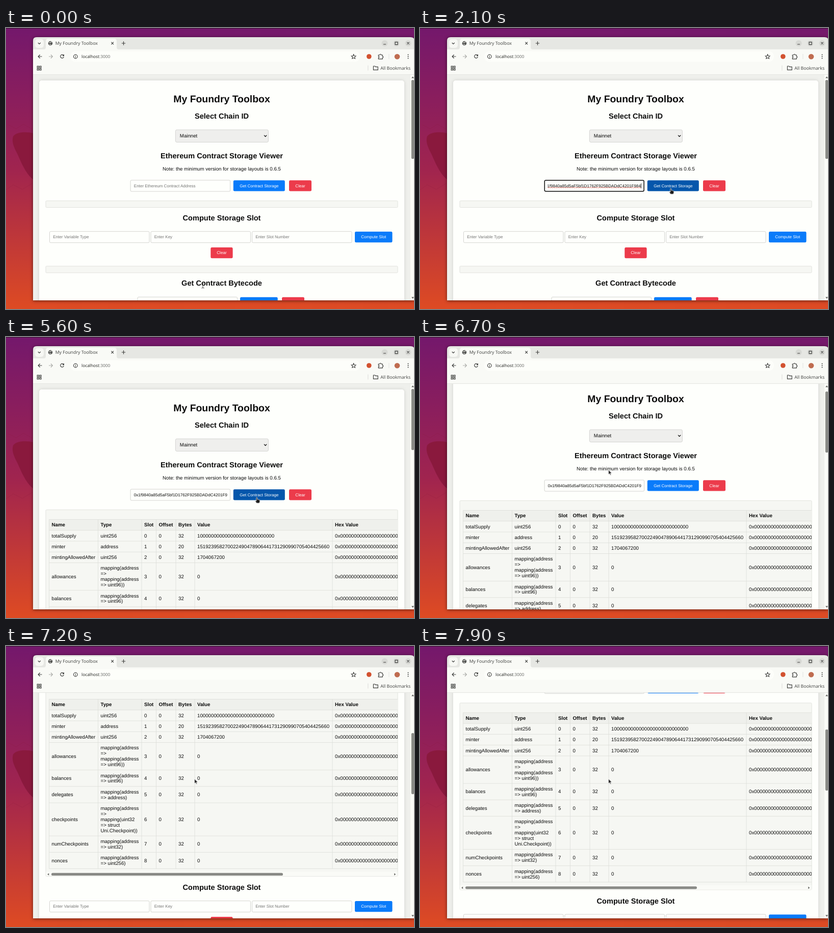
Write an HTML page that moves like this. It is 800 px wide and 552 px high and loops after 8000 ms.

```html
<!DOCTYPE html>
<html lang="en">
<head>
<meta charset="utf-8">
<title>My Foundry Toolbox</title>
<style>
html, body { margin: 0; width: 100%; height: 100%; overflow: hidden; background: #74186c; }
svg { display: block; width: 800px; height: 552px; }
text { font-family: "Liberation Sans", Arial, sans-serif; font-size: 9.71px; fill: #0c0c0c; white-space: pre; text-rendering: geometricPrecision; }
.h1 { font-size: 19.42px; font-weight: bold; text-anchor: middle; }
.h2 { font-size: 14.57px; font-weight: bold; text-anchor: middle; }
.mid { text-anchor: middle; }
.bold { font-weight: bold; }
.small { font-size: 8.09px; }
.hint { font-size: 8.09px; fill: #757575; }
.label { font-size: 8.09px; fill: #fff; text-anchor: middle; }
.ui { font-family: "Noto Sans", "Open Sans", sans-serif; font-size: 8.75px; fill: #4a4b49; }
.url { font-size: 8.3px; fill: #2a2b29; }
.icon { fill: none; stroke: #3c3d3b; stroke-width: 1.15; }
.blue { fill: #0a7bfa; }
.red { fill: #ec3b4b; }
.field { fill: #fefffc; stroke: #c9cac6; stroke-width: .8; }
.panel { fill: #f6f7f3; stroke: #dcddd9; stroke-width: .8; }
.grid { fill: none; stroke: #dcddd9; stroke-width: .8; }
.window { filter: drop-shadow(0 1px 3px rgba(0, 0, 0, .55)); }
.card { fill: #fefffc; filter: drop-shadow(0 0 3px rgba(0, 0, 0, .13)); }
</style>
</head>
<body>
<svg id="stage" viewBox="0 0 800 552" xmlns="http://www.w3.org/2000/svg"></svg>
<script>
const LOOP = 8000;
const ADDRESS = "0x1f9840a85d5aF5bf1D1762F925BDADdC4201F984";
const TABLE_SHIFT = 355;

const text = (x, y, str, cls = "") => `<text x="${x}" y="${y}" class="${cls}">${str}</text>`;
const rect = (x, y, w, h, attrs = "", r = 0) => `<rect x="${x}" y="${y}" width="${w}" height="${h}" rx="${r}" ${attrs}/>`;
const path = (d, attrs = 'class="icon"') => `<path d="${d}" ${attrs}/>`;
const circle = (x, y, r, attrs) => `<circle cx="${x}" cy="${y}" r="${r}" ${attrs}/>`;
const group = (id, body, attrs = "") => `<g id="${id}" ${attrs}>${body}</g>`;
const input = (x, y, hint) =>
  rect(x, y, 195.5, 22, 'class="field"', 2) + text(x + 6.7, y + 13.7, hint, "hint");
const button = (x, y, w, label, cls, id = "") =>
  rect(x, y, w, 21.3, `class="${cls}" id="${id}"`, 2.4) + text(x + w / 2, y + 13.4, label, "label");

function desktop() {
  return `<defs>
    <linearGradient id="sky" x1="0" y1="0" x2="0" y2="1">
      <stop offset="0" stop-color="#74186c"/><stop offset=".5" stop-color="#a0244f"/><stop offset="1" stop-color="#de4b23"/>
    </linearGradient>
    <clipPath id="view"><rect x="53" y="92" width="740" height="443"/></clipPath>
    <clipPath id="inner"><rect x="250.4" y="300" width="183.4" height="20"/></clipPath>
    <clipPath id="wide"><rect x="78" y="339" width="690" height="370"/></clipPath>
  </defs>` +
  rect(0, 0, 800, 552, 'fill="url(#sky)"') +
  rect(0, 0, 800, 1, 'fill="#35142f"') +
  path("M54 207C40 203 20 204 14 213C10 226 18 238 24 251C32 270 42 290 54 298Z", 'fill="#8a193d"') +
  path("M0 318l14-10 18 9 20-12M4 190l16 8 14-9 18 10", 'fill="none" stroke="#8a193d" stroke-opacity=".25"');
}

function browser() {
  const controls = [742.5, 765.5, 788.5].map(x => circle(x, 30, 6, 'fill="#d7d8d4"')).join("");
  const squares = [61.2, 66].flatMap(x => [75, 79.8].map(y => rect(x, y, 3, 3, 'class="icon" stroke-width=".9"'))).join("");
  const dots = [52.6, 56, 59.4].map(y => circle(788.5, y, 1, 'fill="#3c3d3b"')).join("");
  return path("M53 535V25Q53 18 60 18H793Q801 18 801 25V535Z", 'fill="#e6e7e3" class="window"') +
    rect(57, 22, 17, 17, 'fill="#f7f8f4"', 5) + path("M62.8 29l2.5 2.5 2.5-2.5") +
    path("M74 42Q78 42 78 38V26Q78 21 83 21H212Q217 21 217 26V38Q217 42 221 42Z", 'fill="#f9faf6"') +
    circle(87, 30, 4.3, 'fill="#555654"') +
    path("M84 28l3 1 1-2 2 1M85 32l2 0 1 1.5", 'fill="none" stroke="#f2f3ef" stroke-width="1"') +
    text(96.7, 33.2, "My Foundry Toolbox", "ui") +
    path("M206.4 27.7l4.6 4.6m0-4.6l-4.6 4.6") + path("M230.5 26.3v7.4m-3.7-3.7h7.4") +
    controls + path("M740 32h5M763 27.6h5v5h-5zM786.3 27.8l4.4 4.4m0-4.4l-4.4 4.4") +
    rect(53, 42, 747, 50, 'fill="#f9faf6"') +
    rect(126, 45.5, 568, 21, 'fill="#fdfefa"', 10.5) +
    path("M70.5 56h-7.3m3.4-3.5l-3.5 3.5 3.5 3.5") +
    path("M84 56h7.3m-3.4-3.5l3.5 3.5-3.5 3.5", 'fill="none" stroke="#a9aaa6" stroke-width="1.1"') +
    path("M113 54a3.4 3.4 0 1 0 .3 2.8M113.4 52v2.6h-2.6") +
    circle(136.3, 56, 3.8, 'class="icon"') + path("M136.3 55.4v2.8m0-4.8v1") +
    `<text x="148" y="59.2" class="ui url">localhost<tspan fill="#6f706e">:3000</tspan></text>` +
    path("M681.6 51.8l1.3 2.9 3.1.3-2.3 2.1.7 3.1-2.8-1.6-2.8 1.6.7-3.1-2.3-2.1 3.1-.3z", 'class="icon" stroke-width=".9"') +
    circle(711.8, 56, 4.8, 'fill="#d2512f"') +
    path("M730.3 53h2.5a1.5 1.5 0 0 1 3 0h2.4v2.6a1.5 1.5 0 0 1 0 3v2.2h-7.9v-2.4a1.4 1.4 0 0 0 0-2.8z") +
    rect(750.5, 51, .8, 10, 'fill="#dcddd9"') +
    circle(767, 56.3, 5.3, 'fill="#bf6c50"') + dots +
    squares + rect(709.5, 73.5, .8, 10, 'fill="#d3d4d0"') +
    path("M720.4 75h3.2l1.2 1.3h4.4v6h-8.8z") + text(734.2, 81.8, "All Bookmarks", "ui") +
    rect(53, 91.2, 747, .8, 'fill="#dfe0dc"');
}

function table() {
  const cols = [84.5, 180.5, 266, 294.5, 333, 370, 640, 790];
  const rows = [
    ["totalSupply", "uint256", 32, "1" + "0".repeat(27)],
    ["minter", "address", 20, "151923958270022490478906441731290990705404425660"],
    ["mintingAllowedAfter", "uint256", 32, "1704067200"],
    ["allowances", "mapping(address|=&gt;|mapping(address|=&gt; uint96))", 32, "0"],
    ["balances", "mapping(address|=&gt; uint96)", 32, "0"],
    ["delegates", "mapping(address|=&gt; address)", 32, "0"],
    ["checkpoints", "mapping(address|=&gt;|mapping(uint32|=&gt; struct|Uni.Checkpoint))", 32, "0"],
    ["numCheckpoints", "mapping(address|=&gt; uint32)", 32, "0"],
    ["nonces", "mapping(address|=&gt; uint256)", 32, "0"]
  ].map(([name, type, bytes, value], slot) => [name, type, slot, 0, bytes, value, "0x" + "0".repeat(40)]);
  rows.unshift(["Name", "Type", "Slot", "Offset", "Bytes", "Value", "Hex Value"]);

  const LINE = 10.95, top = 358.5;
  let y = top, out = "", lines = `M84.5 ${top}H790`;
  rows.forEach((cells, r) => {
    const h = 10.3 + LINE * cells[1].split("|").length;
    if (!r) out += rect(84.5, y, 706, h, 'fill="#eff0ec"');
    cells.forEach((cell, c) => {
      const parts = String(cell).split("|");
      parts.forEach((part, i) => {
        const base = y + h / 2 + 3.3 + (i - (parts.length - 1) / 2) * LINE;
        out += text(cols[c] + 5, base.toFixed(2), part, r ? "" : "bold");
      });
    });
    y += h;
    lines += `M84.5 ${y.toFixed(2)}H790`;
  });
  cols.forEach(x => lines += `M${x} ${top}V${y.toFixed(2)}`);

  return rect(78, 339.5, 690, 367, 'class="panel"', 1.5) +
    `<g clip-path="url(#wide)">${out}${path(lines, 'class="grid"')}</g>` +
    rect(78.5, 697.5, 689, 8.7, 'fill="#fafbf7"') +
    rect(89, 699.8, 454, 5.2, 'fill="#898a86"', 2.6) +
    path("M84.2 700.2v4.6l-3-2.3zM761.2 700.2v4.6l3-2.3z", 'fill="#646561"');
}

function page() {
  const squiggle = "M250 313.6" + "q.9-1.4 1.8 0t1.8 0".repeat(51);
  const typed = `<g clip-path="url(#inner)">` +
    group("pasted", text(433, 312.7, ADDRESS, "small").replace("<text", '<text text-anchor="end"') +
      path(squiggle, 'fill="none" stroke="#e8382e" stroke-width=".7"')) +
    group("settled", text(250.7, 312.7, ADDRESS, "small")) + "</g>";

  const lower = rect(78, 467.8, 690, 13, 'class="panel"', 1.5) +
    text(423, 378.2, "Compute Storage Slot", "h2") +
    input(85.5, 399.7, "Enter Variable Type") + input(284, 399.7, "Enter Key") + input(482.5, 399.7, "Enter Slot Number") +
    button(684, 400, 73.5, "Compute Slot", "blue") + button(401.3, 431, 43.3, "Clear", "red") +
    text(423, 506.3, "Get Contract Bytecode", "h2") +
    input(258, 528.5, "Enter Contract Address") +
    button(459, 528.8, 73.7, "Get Bytecode", "blue") + button(541, 528.8, 44, "Clear", "red");

  const body = rect(65, 103, 716, 1600, 'class="card"', 5) +
    text(423, 146.3, "My Foundry Toolbox", "h1") +
    text(423, 177.8, "Select Chain ID", "h2") +
    rect(332.4, 200, 182, 24.3, 'fill="#efefed" stroke="#cbccc8" stroke-width=".8"', 2.5) +
    text(340.8, 215.4, "Mainnet") + path("M506 210.6l2.6 2.7 2.6-2.7", 'fill="none" stroke="#111" stroke-width="1.3"') +
    text(423, 256.2, "Ethereum Contract Storage Viewer", "h2") +
    text(423, 280.3, "Note: the minimum version for storage layouts is 0.6.5", "mid") +
    rect(244.1, 299, 195.5, 22, 'class="field"', 2) +
    group("hint", text(250.8, 312.7, "Enter Ethereum Contract Address", "hint")) +
    typed +
    group("focus", rect(244.3, 299.2, 194.8, 21.5, 'fill="none" stroke="#101010" stroke-width="1.5"', 2.2)) +
    group("caretStart", rect(250.6, 305.3, .8, 9.4, 'fill="#000"')) +
    group("caretEnd", rect(433, 305.3, .8, 9.4, 'fill="#000"')) +
    button(445.8, 299.3, 101, "Get Contract Storage", "blue", "fetch") +
    button(555, 299.3, 44, "Clear", "red") +
    group("empty", rect(78, 339.5, 690, 13, 'class="panel"', 1.5)) +
    group("result", table()) + group("lower", lower);

  return rect(53, 92, 740, 443, 'fill="#eff0ec"') +
    `<g clip-path="url(#view)">${group("scroll", body)}</g>` +
    rect(793, 92, 7, 443, 'fill="#fafbf7"') +
    path("M795 98.5h5l-2.5-3.2zM795 528.5h5l-2.5 3.2z", 'fill="#60615d"') +
    group("thumb", rect(794.8, 102, 5.4, 155, 'fill="#898a86" id="bar"', 2.6));
}

function pointers() {
  const outline = 'stroke="#fff" stroke-width=".7" stroke-linejoin="round" fill="#1c1c1c"';
  return group("mouse",
    group("beam", path("M-2.6-5q2 0 2.6 1 .6-1 2.6-1M0-4v8M-2.6 5q2 0 2.6-1 .6 1 2.6 1", 'fill="none" stroke="#444" stroke-width="1"')) +
    group("arrow", path("M0 0V9.2L2.1 7.3 3.6 10.6 5.1 9.9 3.6 6.8H6.4Z", outline)) +
    group("hand", path("M-1.2.4Q-.2-1 .8.4V4Q2 3.2 2.8 4.2 4 3.7 4.5 4.7 5.8 4.5 5.8 5.8V8L4.8 11H-.6L-3.3 7.2Q-2.8 5.8-1.2 7Z", outline)));
}

document.getElementById("stage").innerHTML = desktop() + browser() + page() + pointers();

// Each track holds its value until the next time in ms.
const css = [];
function track(id, prop, keys) {
  const frames = keys.map(([ms, value]) => `${ms / LOOP * 100}% { ${prop}: ${value}; }`);
  frames.push(`100% { ${prop}: ${keys[keys.length - 1][1]}; }`);
  css.push(`@keyframes ${id} { ${frames.join(" ")} }`, `#${id} { animation: ${id} ${LOOP}ms step-end infinite; }`);
}
const move = (id, keys) => track(id, "transform", keys.map(([ms, x, y]) => [ms, `translate(${x}px, ${y}px)`]));
function show(id, ...spans) {
  const keys = spans.flatMap(([from, to]) => [[from, "visible"], [to, "hidden"]]).filter(k => k[0] < LOOP);
  if (keys[0][0] > 0) keys.unshift([0, "hidden"]);
  track(id, "visibility", keys);
}

const CLICK = 2700, PASTE = 1300, LOADED = 5600;
show("hint", [0, PASTE]);
show("focus", [800, CLICK]);
show("caretStart", [800, PASTE]);
show("caretEnd", [PASTE, 2300]);
show("pasted", [PASTE, CLICK]);
show("settled", [CLICK, LOOP]);
show("empty", [0, LOADED]);
show("result", [LOADED, LOOP]);
move("lower", [[0, 0, 0], [LOADED, 0, TABLE_SHIFT]]);
track("bar", "height", [[0, "155px"], [LOADED, "120px"]]);
track("fetch", "fill", [[0, "#0a7bfa"], [1800, "#0869d4"], [1900, "#0556ab"], [6200, "#0869d4"], [6300, "#0a7bfa"]]);

const scroll = [[0, 0], [6700, 18], [6800, 60], [6900, 105.7], [7000, 152], [7100, 204], [7200, 254], [7300, 286],
  [7500, 280], [7600, 267.3], [7700, 254], [7800, 240], [7900, 227.6]];
move("scroll", scroll.map(([ms, y]) => [ms, 0, -y]));
move("thumb", scroll.map(([ms, y]) => [ms, 0, y * .271]));

move("mouse", [[0, 386, 506], [100, 379, 455], [200, 364, 375], [300, 353, 318], [500, 348, 313], [600, 345, 311],
  [1600, 365, 311], [1700, 415, 313], [1800, 465, 315], [2000, 488, 316], [2100, 492, 315.3],
  [6200, 455, 296], [6300, 395, 270], [6400, 369.6, 261]]);
show("beam", [0, 100], [300, 1800]);
show("hand", [1800, 6200]);
show("arrow", [100, 300], [6200, LOOP]);

const style = document.createElement("style");
style.textContent = css.join("\n");
document.head.append(style);
</script>
</body>
</html>
```
